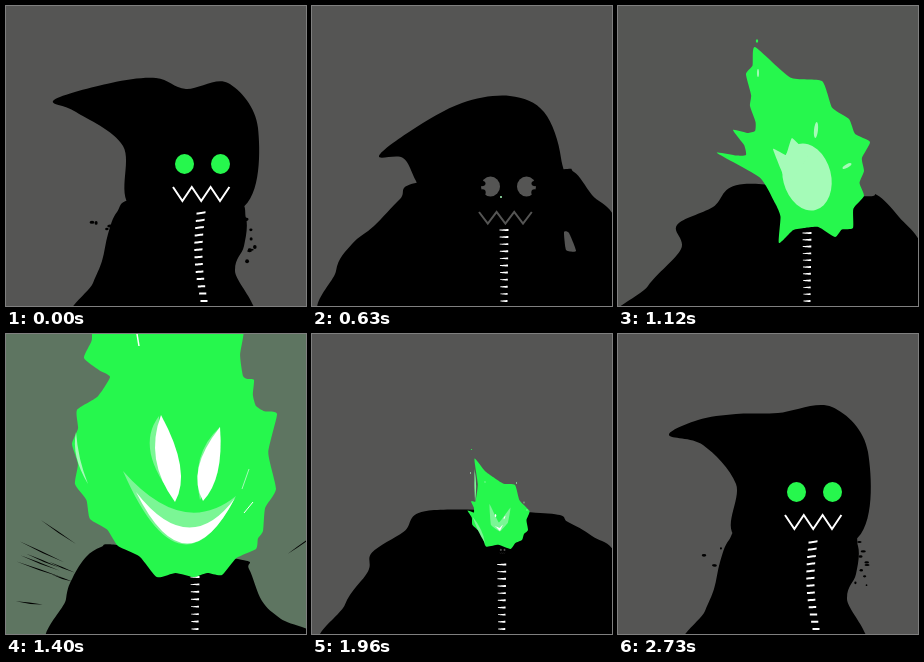
Recreate the animation shown at these times as an HTML page with a canvas. Size 300 px wide and 300 px high, loop 2.8 s.

```html
<!DOCTYPE html>
<html lang="en">
<head>
<meta charset="utf-8">
<title>Hooded flame</title>
<style>
html, body { margin: 0; width: 100%; height: 100%; overflow: hidden; background: #555; }
canvas { display: block; }
</style>
</head>
<body>
<canvas id="stage" width="300" height="300"></canvas>
<script>
const ctx = document.getElementById('stage').getContext('2d');
const STEP = 70, STEPS = 40, PEAK = 20;
const GREEN = [38, 247, 77], WHITE = [255, 255, 255];
const LIME = '#26f74d', PALE = '#a5fbb8', MID = '#7bf695';

const clamp = v => Math.max(0, Math.min(1, v));
const ease = v => { v = clamp(v); return v * v * (3 - 2 * v); };
const lerp = (a, b, k) => a + (b - a) * k;
const mix = (a, b, k) => a.map((v, i) => lerp(v, b[i], k));
const rgb = c => `rgb(${c.map(Math.round).join()})`;

function seeded(seed) {
  return (lo, hi) => {
    seed = (seed * 16807) % 2147483647;
    return lerp(lo, hi, seed / 2147483647);
  };
}

// Each track is a list of [step, values]; values are eased between steps.
function sample(track, step) {
  let i = 0;
  while (i < track.length - 2 && step >= track[i + 1][0]) i++;
  const [from, a] = track[i], [to, b] = track[i + 1];
  return mix(a, b, ease((step - from) / (to - from)));
}

// Closed curve through flat x,y pairs; bend 0 gives straight edges.
function shape(p, fill, bend = 1 / 6) {
  const n = p.length / 2;
  const at = i => [p[(i + n) % n * 2], p[(i + n) % n * 2 + 1]];
  ctx.beginPath();
  ctx.moveTo(p[0], p[1]);
  for (let i = 0; i < n; i++) {
    const [a, b, c, d] = [at(i - 1), at(i), at(i + 1), at(i + 2)];
    ctx.bezierCurveTo(
      b[0] + (c[0] - a[0]) * bend, b[1] + (c[1] - a[1]) * bend,
      c[0] - (d[0] - b[0]) * bend, c[1] - (d[1] - b[1]) * bend, c[0], c[1]);
  }
  ctx.fillStyle = fill;
  ctx.fill();
}

// Flame outline: between two tips the edge is drawn in towards the centre.
function flame(tips, cx, cy, pull) {
  const p = [];
  for (let i = 0; i < tips.length; i += 2) {
    const j = (i + 2) % tips.length;
    const x = (tips[i] + tips[j]) / 2, y = (tips[i + 1] + tips[j + 1]) / 2;
    const k = pull * Math.hypot(tips[i] - tips[j], tips[i + 1] - tips[j + 1]) / Math.hypot(cx - x, cy - y);
    p.push(tips[i], tips[i + 1], lerp(x, cx, k), lerp(y, cy, k));
  }
  shape(p, LIME, 0.09);
}

// Pointed shape from one end to the other, bulging to two control points.
function leaf([ax, ay], [bx, by], there, back, fill) {
  ctx.beginPath();
  ctx.moveTo(ax, ay);
  ctx.quadraticCurveTo(...there, bx, by);
  ctx.quadraticCurveTo(...back, ax, ay);
  ctx.fillStyle = fill;
  ctx.fill();
}

function line(p, color, width) {
  ctx.beginPath();
  for (let i = 0; i < p.length; i += 2) ctx.lineTo(p[i], p[i + 1]);
  ctx.strokeStyle = color;
  ctx.lineWidth = width;
  ctx.stroke();
}

function oval(x, y, rx, ry, fill, turn = 0) {
  ctx.beginPath();
  ctx.ellipse(x, y, rx, ry, turn, 0, Math.PI * 2);
  ctx.fillStyle = fill;
  ctx.fill();
}

function scaled(x, y, s, draw) {
  ctx.save();
  ctx.translate(x, y);
  ctx.scale(s, s);
  ctx.translate(-x, -y);
  draw();
  ctx.restore();
}

const hood = {
  up: [48,94, 105,77, 150,72, 180,83, 222,77, 252,122, 235,203, 128,203, 117,140, 70,106],
  swing: [51,101, 80,86, 118,80, 160,79, 214,73, 250,118, 236,207, 121,205, 118,150, 85,111],
  low: [67,150, 100,124, 150,97, 198,90, 232,106, 249,152, 245,205, 120,205, 104,175, 91,152]
};
const body = {
  slim: [70,320, 87,277, 96,255, 102,228, 111,206, 130,193, 225,193, 240,212, 238,240, 229,265, 240,320],
  wide: [27,320, 24,265, 40,238, 62,220, 88,193, 108,176, 242,164, 262,166, 280,189, 305,220, 305,320],
  burst: [10,320, 30,280, 63,243, 59,219, 95,201, 126,178, 243,190, 259,189, 281,211, 305,245, 305,320],
  blaze: [57,320, 60,265, 67,243, 80,223, 95,213, 114,211, 232,225, 243,235, 256,267, 275,285, 312,310],
  calm: [22,320, 42,276, 72,237, 58,217, 96,202, 126,177, 230,195, 250,210, 280,215, 305,232, 305,320]
};
const hoods = [[0, hood.up], [9, hood.low], [32, hood.low], [39, hood.swing], [40, hood.up]];
const bodies = [[0, body.slim], [9, body.wide], [16, body.burst], [PEAK, body.blaze],
  [24, body.calm], [32, body.wide], [39, body.slim]];
// top x, top y
const zips = [[0, [195, 207]], [9, [192, 224]], [16, [189, 227]], [PEAK, [189, 243]],
  [24, [187.5, 237]], [32, [192, 224]], [39, [195, 208]]];

function drawZip(step, droop) {
  const [x0, y0] = sample(zips, step);
  const upright = 1 - droop, count = Math.round((295 - y0) / 7.1);
  for (let i = 0; i <= count; i++) {
    const k = i / count, y = lerp(y0, 295, k), half = 4.5 - k;
    const x = x0 + upright * (3 * k - 4 * Math.sin(Math.PI * k));
    const tilt = 0.7 * upright * (1 - k), thin = lerp(0.4, 1, upright);
    shape([x - half, y + tilt - thin, x + half, y - tilt - 1, x + half, y - tilt + 1, x - half, y + tilt + thin], '#fff', 0);
  }
}

function drawDrops(step) {
  const size = clamp(1 - Math.min(step, STEPS - step) / 6);
  const rand = seeded(step < PEAK ? 71 : 95);
  for (let i = 0; i < 13; i++) {
    const x = i < 4 ? rand(86, 104) : rand(236, 250), y = rand(205, i < 4 ? 238 : 256);
    oval(x, y, rand(1, 3.2) * size, rand(1, 2) * size, '#000');
  }
}

function drawHood(step, sky, droop) {
  const lit = step < PEAK ? 1 - ease((step - 4) / 5) : ease((step - 32) / 5);
  const bite = 4 * (1 - lit), eyeY = lerp(158, 180.5, droop);
  shape(sample(hoods, step), '#000');
  for (const side of [-1, 1]) {
    const x = 196.5 + side * 18;
    oval(x, eyeY, 9.5, 10, rgb(mix(sky, GREEN, lit)));
    oval(x + side * 9, eyeY - 3, bite, bite * 0.7, '#000');
    oval(x + side * 8, eyeY + 6, bite * 0.8, bite * 0.8, '#000');
  }
  const teeth = [];
  for (let i = 0; i < 7; i++)
    teeth.push(167 + i * lerp(9.4, 8.8, droop), lerp(181, 206, droop) + i % 2 * lerp(14, 11.5, droop));
  line(teeth, rgb(mix(sky, WHITE, lit)), 2);
}

function drawRise() {
  flame([161,237, 157,197, 99,147, 128,149, 115,124, 137,125, 132,100, 128,68, 137,41, 204,75, 231,113,
    252,136, 246,165, 246,190, 235,222, 217,231, 187,222], 185, 170, 0.18);
  oval(189, 171, 24, 34, PALE, -0.25);
  shape([155,143, 168,149, 174,132, 190,150, 170,178], PALE, 0.05);
  oval(198, 124, 2, 8, PALE, 0.1);
  oval(229, 160, 5, 1.8, PALE, -0.5);
  oval(140, 67, 1, 4, PALE);
  oval(139, 35, 1.2, 1.8, LIME);
}

function drawHigh() {
  flame([88,-20, 78,24, 104,43, 71,76, 66,110, 69,150, 84,185, 112,212, 151,243, 188,243, 216,241, 250,215,
    257,197, 270,155, 271,80, 250,72, 248,46, 237,42, 237,-10, 165,-70], 170, 130, 0.11);
  leaf([153, 82], [170, 166], [150, 145], [128, 115], MID);
  leaf([214, 93], [194, 166], [208, 140], [184, 120], MID);
  leaf([117, 137], [230, 162], [177, 205], [175, 270], MID);
  leaf([155, 81], [169, 168], [186, 138], [138, 126], '#fff');
  leaf([214, 93], [197, 167], [218, 145], [180, 136], '#fff');
  leaf([130, 158], [229, 164], [183, 226], [180, 258], '#fff');
  leaf([70, 98], [82, 150], [72, 125], [65, 122], PALE);
  line([131, 0, 133, 12], '#fff', 1.5);
  line([243, 135, 236, 155], PALE, 1);
  line([247, 168, 238, 179], '#fff', 1);
}

function drawFall() {
  flame([158,220, 131,177, 121,148, 134,152, 128,130, 137,129, 135,44, 172,81, 216,97, 245,149, 242,187,
    230,207, 207,225], 185, 160, 0.12);
  leaf([135, 65], [136, 130], [141, 100], [134, 100], MID);
  leaf([131, 160], [156, 213], [152, 186], [140, 188], MID);
  shape([165,135, 184,172, 207,142, 202,172, 186,190, 168,177], MID, 0.04);
  shape([176,179, 185,183, 192,176, 186,189], '#fff', 0);
  oval(177, 158, 1.5, 3, '#fff');
  oval(195, 162, 1, 4, '#fff', 0.4);
  for (const [x, y] of [[127, 73], [156, 91], [219, 93], [234, 132], [240, 147]]) oval(x, y, 0.8, 2, PALE);
  oval(129, 26, 1.2, 1.2, LIME);
}

// Speed lines fanning out from the chest on both sides.
function drawStreaks() {
  const rand = seeded(4242);
  for (let i = 0; i < 16; i++) {
    const side = i % 2 ? 1 : -1, angle = rand(0.1, 0.62);
    const near = rand(118, 150), far = near + rand(18, 50);
    const at = (r, shift = 0) => [185 + side * r * Math.cos(angle), 288 - r * Math.sin(angle) + shift];
    leaf(at(near), at(far), at((near + far) / 2, 1.8), at((near + far) / 2, -0.8), '#000');
  }
}

function drawFlame(step) {
  if (step === 9 || step === 32) oval(189, 191, 1, 1, PALE);
  else if (step > 9 && step < 17) scaled(190, 205, ease((step - 8) / 8), drawRise);
  else if (step === 17) scaled(190, 230, 1.15, drawRise);
  else if (step > 17 && step < 23) scaled(190, 238, 1 - 0.07 * Math.abs(step - PEAK), drawHigh);
  else if (step === 23) scaled(190, 220, 1.12, drawFall);
  else if (step > 23 && step < 32) scaled(190, 205, 1 - ease((step - 24) / 8), drawFall);
}

function draw(step) {
  const droop = Math.min(ease(step / 9), ease((39 - step) / 7));
  const heat = ease(1 - Math.abs(step - PEAK) / 4.5);
  const sky = mix([85, 85, 84], [94, 117, 97], heat);
  ctx.fillStyle = rgb(sky);
  ctx.fillRect(0, 0, 300, 300);
  if (step > 17 && step < 23) drawStreaks();

  shape(sample(bodies, step), '#000');
  drawDrops(step);
  const sinceLow = Math.min(Math.abs(step - 9), Math.abs(step - 32));
  if (sinceLow < 2) shape([252,226, 257,227, 264,245, 254,244], rgb(sky), 0.08);

  const sunk = ease((Math.min(step - 9, 32 - step)) / 5);
  if (sunk < 1) scaled(190, 220, 1 - sunk, () => drawHood(step, sky, droop));
  drawZip(step, droop);
  drawFlame(step);
}

function tick() {
  draw(Math.floor(performance.now() / STEP) % STEPS);
  requestAnimationFrame(tick);
}
tick();
</script>
</body>
</html>
```
